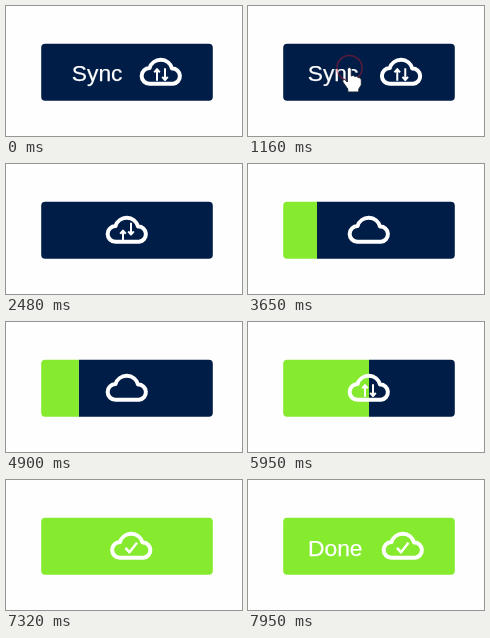
Recreate the animation shown at these times as an HTML page. Size 236 by 130 pixels, loop 8000 ms.

```html
<!DOCTYPE html>
<html lang="en">
<head>
<meta charset="utf-8">
<title>Sync button</title>
<style>
  html, body { margin: 0; width: 100%; height: 100%; overflow: hidden; background: #fefefe; }
  svg { display: block; width: 236px; height: 130px; }
  text { font: 22.8px "Liberation Sans", Arial, sans-serif; fill: #fff; stroke: #fff; stroke-width: .25; }
  .line { fill: none; stroke: #fff; stroke-linejoin: round; }
</style>
</head>
<body>
<svg viewBox="0 0 236 130">
  <defs>
    <clipPath id="button"><rect x="35.2" y="37.7" width="171.6" height="57" rx="4"/></clipPath>
    <path id="shape" d="M-11.5 11.5A7.85 7.85 0 0 1-11.5-4.2A11.7 11.7 0 0 1 11-3.7A7.62 7.62 0 0 1 12 11.5Z"/>
    <clipPath id="inside"><use href="#shape"/></clipPath>
  </defs>
  <g clip-path="url(#button)">
    <rect id="base" y="37" height="59" fill="#001d48"/>
    <rect id="fill" x="35" y="37" height="59" fill="#86ea2e"/>
    <text id="sync" y="74.6">Sync</text>
    <text id="done" y="75.8">Done</text>
  </g>
  <g id="cloud">
    <g clip-path="url(#inside)">
      <path id="up" class="line" stroke-width="2" d="M-4 8.5V-3M-6.8 0L-4-3.2L-1.2 0"/>
      <path id="down" class="line" stroke-width="2" d="M4-4V7.5M1.2 4.5L4 7.7L6.8 4.5"/>
    </g>
    <use href="#shape" class="line" stroke-width="4"/>
    <path id="check" class="line" stroke-width="2.5" pathLength="1" stroke-dasharray="1 2" d="M-6 1.5L-2 6L5.5-3.5"/>
  </g>
  <circle id="ring" cx="101.5" cy="62" fill="none" stroke="#d01a2c" stroke-width="1.5"/>
  <path id="hand" fill="#fff" stroke="#142036" stroke-width="1"
    d="M-2 1.5Q-2-.5 0-.5T2 1.5V8Q4 6.5 5.5 8.5Q7.5 7.5 8.8 9.5Q12 9 12 12V17L9.5 21V24H-1.5V21L-6.5 14Q-7.5 11-4.5 11.5L-2 14Z"/>
</svg>
<script>
const $ = id => document.getElementById(id);
const set = (id, attrs) => {
  for (const name in attrs) $(id).setAttribute(name, attrs[name]);
};
const ramp = (t, from, to) => Math.min(1, Math.max(0, (t - from) / (to - from)));
const smooth = (t, from, to) => {
  const u = ramp(t, from, to);
  return u * u * (3 - 2 * u);
};
const easeOut = (t, from, to) => 1 - (1 - ramp(t, from, to)) ** 3;

// Arrows leave the cloud at the first time and have come back by the second.
const cycles = [[1860, 2760], [3090, 4300], [4500, 5950], [6690, 1e9]];
const travel = 28;
function arrowShift(t) {
  const [leave, settle] = cycles.findLast(c => t >= c[0]) || [1e9, 0];
  if (t < leave) return 0;
  const enter = settle - 560;
  return t < enter
    ? travel * ramp(t, leave, leave + 340) ** 2
    : -travel * (1 - easeOut(t, enter, settle));
}

function draw(t) {
  const progress = 34 * smooth(t, 3090, 3650) + 52 * smooth(t, 4760, 5600)
    + 87 * smooth(t, 6210, 6490);
  set('fill', { width: progress });
  set('base', { x: 35 + progress, width: 173 - progress });

  set('sync', { x: 65.8 - 26 * smooth(t, 1020, 1470), opacity: 1 - ramp(t, 1160, 1470) });
  set('done', { x: 48 + 12 * easeOut(t, 7460, 7880), opacity: ramp(t, 7460, 7800) });

  const x = 155 - 34 * (smooth(t, 1050, 1860) - smooth(t, 7180, 7800));
  set('cloud', { transform: `translate(${x} 66.3)` });
  const shift = arrowShift(t);
  set('up', { transform: `translate(0 ${-shift})` });
  set('down', { transform: `translate(0 ${shift})` });
  const drawn = ramp(t, 6900, 7180);
  set('check', { 'stroke-dashoffset': 1 - drawn, opacity: drawn ? 1 : 0 });

  const click = ramp(t, 1020, 1520);
  set('ring', { r: 3 + 34 * click, opacity: click ? .6 * (1 - click) : 0 });

  const away = 1 - smooth(t, 70, 620);
  set('hand', {
    transform: `translate(${101.3 + 139 * away} ${62 + 72 * away})`,
    opacity: 1 - ramp(t, 1400, 1600)
  });
}

const start = performance.now();
function tick() {
  draw((performance.now() - start) % 8000);
  requestAnimationFrame(tick);
}
tick();
</script>
</body>
</html>
```
